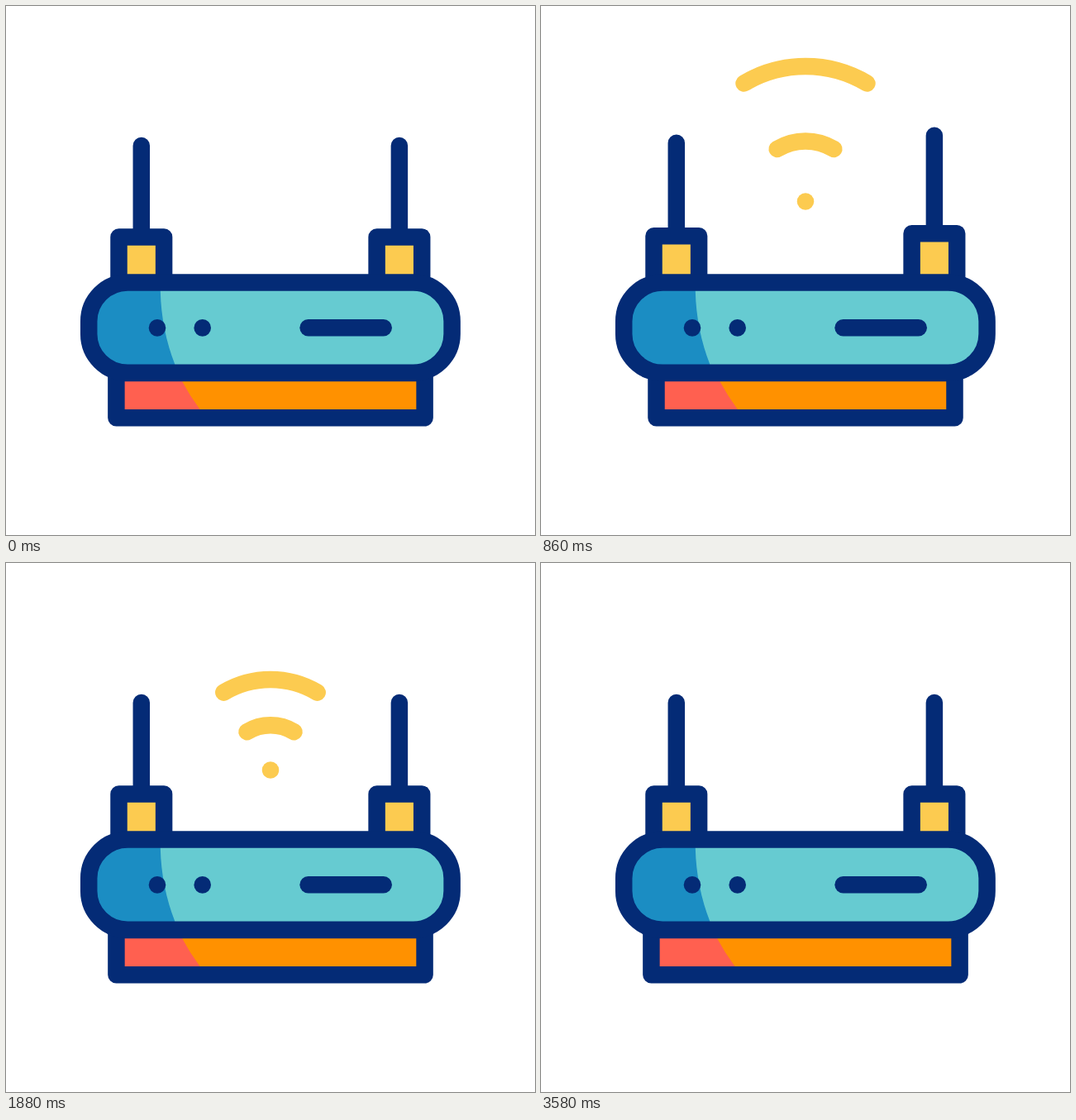
An HTML page that plays this animation: 640x640 px, repeating every 3.6 s.

```html
<!DOCTYPE html>
<html lang="en">
<head>
<meta charset="utf-8">
<title>Router</title>
<style>
  html, body { margin: 0; width: 100%; height: 100%; overflow: hidden; background: #fff; }
  svg { display: block; width: 100vw; height: 100vh; }
  .line { fill: none; stroke: #042b76; stroke-width: 20.5; stroke-linecap: round; stroke-linejoin: round; }
  .wave { fill: none; stroke: #fccb50; stroke-width: 20.5; stroke-linecap: round; }
  .ink { fill: #042b76; }
  .sun { fill: #fccb50; }
</style>
</head>
<body>
<svg viewBox="0 0 640 640">
  <g id="signal">
    <path class="wave"/>
    <path class="wave"/>
    <path class="wave"/>
  </g>
  <g id="antennas">
    <g><path class="sun"/><path class="line"/></g>
    <g><path class="sun"/><path class="line"/></g>
  </g>
  <g id="base">
    <path fill="#ff9100"/>
    <path fill="#ff6050"/>
    <path class="line"/>
  </g>
  <clipPath id="shell"><rect x="100.2" y="334.6" width="439.4" height="109.2" rx="47"/></clipPath>
  <g clip-path="url(#shell)">
    <path fill="#66cbd1" d="M100 334H540V444H100Z"/>
    <path fill="#1b8dc3" d="M100 334H186.8V345Q188 392 204.5 434L208 444H100Z"/>
  </g>
  <rect class="line" x="100.2" y="334.6" width="439.4" height="109.2" rx="47"/>
  <circle class="ink" cx="183" cy="389.4" r="10.3"/>
  <circle class="ink" cx="237.7" cy="389.4" r="10.3"/>
  <path class="line" d="M365.6 389.3H456.7"/>
</svg>
<script>
  const LOOP = 3600;
  const ORIGIN = 358;   // the signal grows out of this height
  const FLOOR = 333;    // the antennas stretch from here

  const waves = [
    { y: 250.6, half: 0, r: 0, on: 540, out: 2460 },
    { y: 196.4, half: 28.5, r: 55, on: 660, out: 2580 },
    { y: 141.8, half: 56.5, r: 110.5, on: 780, out: 2700 }
  ];
  const masts = [{ x: 163.8, start: 20 }, { x: 475.9, start: 153 }];

  const signalPaths = document.querySelectorAll('#signal path');
  const mastGroups = document.querySelectorAll('#antennas g');
  const [orange, red, frame] = document.querySelectorAll('#base path');

  const clamp = v => Math.min(1, Math.max(0, v));
  const sink = u => 0.242 * Math.pow(clamp(u), 2.3);

  function waveScale(t, { on, out }) {
    const age = t - on;
    if (age <= 0 || t >= out + 840) return 0;
    if (t >= out) return 1 - sink((t - out) / 840);
    if (age < 20) return 0.977 * age / 20;
    if (age < 40) return 0.977 + 0.393 * (age - 20) / 20;
    return 1 + 0.37 * Math.exp(-0.0037 * (age - 40)) * clamp((1300 - age) / 400);
  }

  function mastScale(t, start) {
    const age = t - start;
    if (age < 313) return 1 - sink(age / 333);
    if (age < 333) return 0.79 + 0.63 * (age - 313) / 20;
    return 1 + 0.42 * clamp(1 - (age - 333) / 650) ** 2;
  }

  function baseDip(t) {
    if (t < 520) return 0.074 * clamp((t - 20) / 500) ** 2;
    return 0.074 * Math.exp(-0.0024 * (t - 520)) * clamp((1900 - t) / 300);
  }

  function drawWave(path, w, s) {
    path.style.display = s > 0 ? '' : 'none';
    const y = ORIGIN + (w.y - ORIGIN) * s;
    const half = w.half * s, r = w.r * s;
    const end = y + r - Math.sqrt(r * r - half * half);
    path.setAttribute('d', w.r
      ? `M${320 - half} ${end}A${r} ${r} 0 0 1 ${320 + half} ${end}`
      : `M320 ${y}h.01`);
  }

  function drawMast(group, x, s) {
    const top = FLOOR - 164 * s, lid = FLOOR - 53.6 * s;
    const box = `M${x - 27.3} 335V${lid}H${x + 27.3}V335`;
    group.children[0].setAttribute('d', box + 'Z');
    group.children[1].setAttribute('d', `${box}M${x} ${top}V${lid}`);
  }

  function drawBase(dip) {
    const half = 186.6 * (1 - dip);
    const l = 320 - half, r = 320 + half;
    const split = 3.3 * clamp(dip / 0.013);
    const box = `M${l} 444H${r}V498.2H${l}Z`;
    orange.setAttribute('d', box);
    red.setAttribute('d', `M${l} 444H${207 + split}L${213 + split} 454Q${222 + split} 471 ${234.5 + split} 488L${242 + split} 498H${l}Z`);
    frame.setAttribute('d', box);
  }

  function draw() {
    const t = performance.now() % LOOP;
    waves.forEach((w, i) => drawWave(signalPaths[i], w, waveScale(t, w)));
    masts.forEach((m, i) => drawMast(mastGroups[i], m.x, mastScale(t, m.start)));
    drawBase(baseDip(t));
    requestAnimationFrame(draw);
  }
  draw();
</script>
</body>
</html>
```
